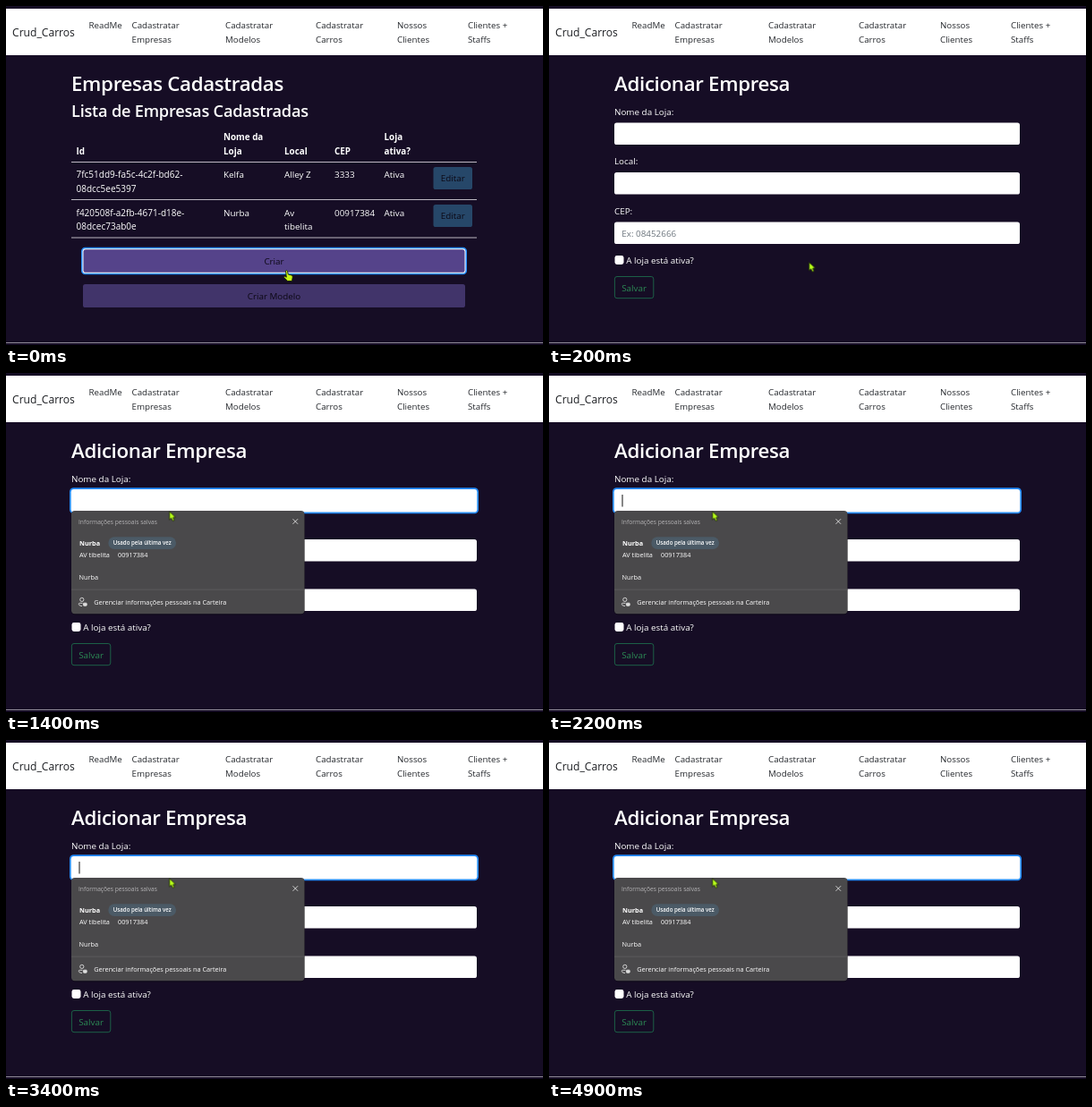
Recreate the animation shown at these times as an HTML page. Size 600 px wide and 379 px high, loop 5 s.

```html
<!DOCTYPE html>
<html lang="pt-BR">
<head>
<meta charset="utf-8">
<title>Crud_Carros</title>
<style>
  html, body { margin: 0; width: 100%; height: 100%; overflow: hidden; background: #160d25; }
  svg { display: block; width: 100vw; height: 100vh; }
  text { font: 500 9.85px "Open Sans", "Noto Sans", sans-serif; fill: #fff; white-space: pre; }
  .brand { font-size: 12.1px; font-weight: 400; fill: #1d1f23; }
  .nav text { font-size: 9.75px; font-weight: 400; fill: #25282d; }
  .h1 { font-size: 22.3px; font-weight: 600; letter-spacing: -.32px; }
  .h2 { font-size: 18.2px; font-weight: 600; letter-spacing: -.22px; }
  .th text { font-weight: 700; }
  .id { font-size: 10px; }
  .mid { text-anchor: middle; }
  .dark { fill: #0c0814; font-weight: 400; }
  .hint { fill: #6c757d; font-weight: 400; }
  .field { fill: #fff; }
  .pop text { font-size: 7.3px; }
  .pop .title { font-size: 6.67px; fill: #b4b3b5; font-weight: 400; }
  .pop .name { font-weight: 700; }
  .pop .tag { font-size: 6.15px; font-weight: 600; }
  .icon { fill: none; stroke: #dedede; stroke-width: .9; }

  .list, .form, .thin, .ring, .pop, .caret, .hand {
    animation: 5s step-end infinite;
  }
  .list { animation-name: leave; }
  .form { animation-name: enter; }
  .thin { animation-name: thin; }
  .ring { animation-name: ring; }
  .pop { animation-name: pop; }
  .caret { animation-name: blink; }
  .hand { animation-name: lift; }
  .arrow { animation: move 5s cubic-bezier(.4, .1, .4, 1) infinite; }

  @keyframes leave { 0% { opacity: 1 } 4%, 100% { opacity: 0 } }
  @keyframes enter { 0% { opacity: 0 } 4%, 100% { opacity: 1 } }
  @keyframes thin { 0% { opacity: 0 } 18% { opacity: 1 } 20%, 100% { opacity: 0 } }
  @keyframes ring { 0% { opacity: 0 } 20%, 100% { opacity: 1 } }
  @keyframes pop { 0% { opacity: 0 } 28%, 100% { opacity: 1 } }
  @keyframes blink {
    0%, 28%, 50%, 70%, 92%, 100% { opacity: 0 }
    18%, 40%, 60%, 82% { opacity: 1 }
  }
  @keyframes lift {
    0% { opacity: 1; transform: none }
    2% { opacity: 1; transform: translate(-8px, -4px) }
    4%, 100% { opacity: 0 }
  }
  @keyframes move {
    0%, 4% { transform: translate(290.3px, 286.3px) }
    16%, 100% { transform: translate(182.3px, 154.5px) }
  }
</style>
</head>
<body>
<svg viewBox="0 0 600 379">
  <rect width="600" height="379" fill="#160d25"/>
  <rect y="3" width="600" height="52" fill="#fff"/>
  <rect y="376" width="600" height="1" fill="#8d8896"/>
  <text class="brand" x="7" y="34.3">Crud_Carros</text>
  <g class="nav">
    <text x="92.5" y="25.3">ReadMe</text>
    <text x="140.5" y="25.3">Cadastratar</text><text x="140.5" y="41">Empresas</text>
    <text x="245" y="25.3">Cadastratar</text><text x="245" y="41">Modelos</text>
    <text x="346" y="25.3">Cadastratar</text><text x="346" y="41">Carros</text>
    <text x="437" y="25.3">Nossos</text><text x="437" y="41">Clientes</text>
    <text x="516" y="25.3">Clientes +</text><text x="516" y="41">Staffs</text>
  </g>

  <g class="list">
    <text class="h1" x="73" y="94.7">Empresas Cadastradas</text>
    <text class="h2" x="73" y="124">Lista de Empresas Cadastradas</text>
    <g class="th">
      <text x="78.5" y="165.5">Id</text>
      <text x="243" y="149.5">Nome da</text><text x="243" y="165.5">Loja</text>
      <text x="311" y="165.5">Local</text>
      <text x="367" y="165.5">CEP</text>
      <text x="422.5" y="149.5">Loja</text><text x="422.5" y="165.5">ativa?</text>
    </g>
    <path d="M73 174.5H526M73 216.5H526M73 259H526" stroke="#bcb8c2"/>
    <text class="id" x="78.5" y="192">7fc51dd9-fa5c-4c2f-bd62-</text><text class="id" x="78.5" y="207.5">08dcc5ee5397</text>
    <text x="243" y="192">Kelfa</text>
    <text x="311" y="192">Alley Z</text>
    <text x="367" y="192">3333</text>
    <text x="422.5" y="192">Ativa</text>
    <text class="id" x="78.5" y="234.5">f420508f-a2fb-4671-d18e-</text><text class="id" x="78.5" y="250">08dcec73ab0e</text>
    <text x="243" y="234.5">Nurba</text>
    <text x="311" y="234.5">Av</text><text x="311" y="250">tibelita</text>
    <text x="367" y="234.5">00917384</text>
    <text x="422.5" y="234.5">Ativa</text>
    <g fill="#264769">
      <rect x="477.5" y="180" width="43.5" height="25" rx="2.6"/>
      <rect x="477.5" y="222" width="43.5" height="25" rx="2.6"/>
    </g>
    <text class="mid dark" x="499.2" y="196">Editar</text>
    <text class="mid dark" x="499.2" y="238">Editar</text>
    <rect x="84" y="269.7" width="431" height="30.6" rx="4.4" fill="#258cfb"/>
    <rect x="85.5" y="271.2" width="428" height="27.6" rx="3.4" fill="#fff"/>
    <rect x="86.5" y="272.2" width="426" height="25.6" rx="2.6" fill="#55438a"/>
    <text class="mid dark" x="299.5" y="289">Criar</text>
    <rect x="86" y="311" width="427" height="26" rx="2.6" fill="#41346a"/>
    <text class="mid dark" x="299.5" y="328">Criar Modelo</text>
  </g>

  <g class="form">
    <text class="h1" x="73" y="94.7">Adicionar Empresa</text>
    <text x="73" y="121.5">Nome da Loja:</text>
    <text x="73" y="177">Local:</text>
    <text x="73" y="232.5">CEP:</text>
    <g class="ring">
      <rect x="71" y="128.2" width="457" height="29.1" rx="4.6" fill="#258cfb"/>
      <rect x="72.7" y="129.9" width="453.6" height="25.7" rx="3.4" fill="#fff"/>
    </g>
    <rect class="field" x="73" y="130.5" width="453" height="24.5" rx="2.6"/>
    <rect class="thin" x="73" y="130.4" width="453" height="24.7" rx="2.8" fill="#fff" stroke="#5a7fc0" stroke-width=".8"/>
    <rect class="field" x="73" y="186" width="453" height="24.5" rx="2.6"/>
    <rect class="field" x="73" y="241.5" width="453" height="24.5" rx="2.6"/>
    <text class="hint" x="81.3" y="257.5">Ex: 08452666</text>
    <rect class="caret" x="81.5" y="136" width="1" height="13.5" fill="#111"/>
    <rect x="73.5" y="279" width="10" height="10" rx="2.4" fill="#fff"/>
    <text x="86.3" y="288">A loja está ativa?</text>
    <rect x="73.4" y="302.5" width="43.4" height="24.2" rx="2.6" fill="none" stroke="#1d6a4c" stroke-width=".9"/>
    <text x="81.2" y="318.5" style="fill:#2c8a55">Salvar</text>
  </g>

  <g class="pop">
    <rect x="72.5" y="154.5" width="261.5" height="116" rx="5" fill="#000" opacity=".3"/>
    <rect x="73" y="154" width="260.5" height="115.3" rx="4" fill="#4a494b"/>
    <text class="title" x="81" y="168.5">Informações pessoais salvas</text>
    <path class="icon" d="M320.5 163.2l5.6 5.6m0-5.6l-5.6 5.6"/>
    <text class="name" x="82" y="192.5">Nurba</text>
    <rect x="114.3" y="183.3" width="75.7" height="13.6" rx="6.8" fill="#4b5a66"/>
    <text class="tag mid" x="152.2" y="192.3">Usado pela última vez</text>
    <text x="82" y="206.3">AV tibelita</text><text x="125" y="206.3">00917384</text>
    <text x="81.5" y="231">Nurba</text>
    <rect x="73" y="241.7" width="260.5" height=".8" fill="#5f5e60"/>
    <g class="icon">
      <circle cx="84.8" cy="253.4" r="2.1"/>
      <path d="M85.5 257.3h-3.2q-1 0-1 1.1q.2 2 3.7 2.2"/>
      <rect x="86.4" y="257.2" width="3.8" height="3" rx=".6" fill="#dedede"/>
    </g>
    <text x="98.3" y="258.8">Gerenciar informações pessoais na Carteira</text>
  </g>

  <g class="hand">
    <path transform="translate(309.5 295)" fill="#c8f514" stroke="#18220a" stroke-width=".9" stroke-linejoin="round"
      d="M3 1.2Q4.2-.2 5 1.4L5.8 5L9.6 6Q11 6.5 10.8 8L10 12.5H5.2L1.2 8.6Q.6 7.3 2 7.2L3.8 8.2Z"/>
  </g>
  <g class="form">
    <path class="arrow" fill="#b8ff1a" stroke="#18220a" stroke-width=".8" stroke-linejoin="round"
      d="M.3 .3V9.6L2.5 7.7L4 11L5.8 10.2L4.4 7.1L7.2 6.8Z"/>
  </g>
</svg>
</body>
</html>
```
